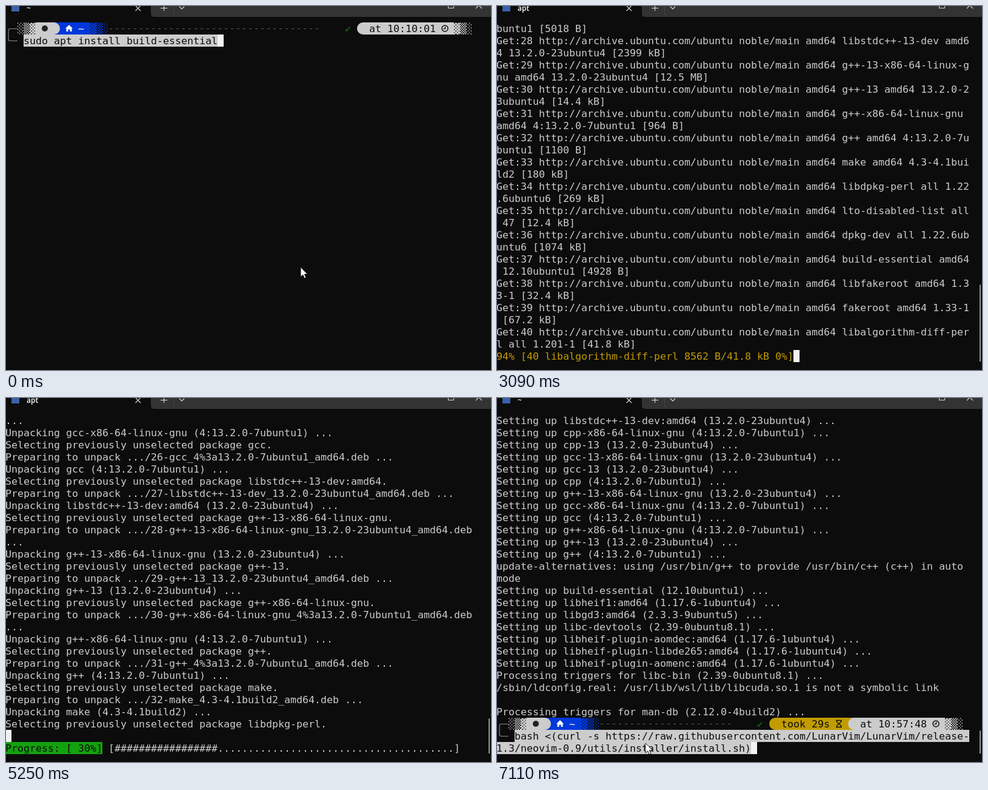
An HTML page with a canvas for the animation above (8000 ms loop, 800 by 600 pixels).

```html
<!DOCTYPE html>
<html lang="en">
<head>
<meta charset="utf-8">
<title>Terminal install</title>
<style>
html, body { margin: 0; width: 100%; height: 100%; overflow: hidden; background: #0c0c0c; }
canvas { display: block; }
</style>
</head>
<body>
<canvas id="c" width="800" height="600"></canvas>
<script>
const g = document.getElementById('c').getContext('2d');
const COLS = 78, ROWS = 28, LOOP = 8000;
const BG = '#0c0c0c', FG = '#cccccc', WHITE = '#f2f2f2', YELLOW = '#c19c00', BLUE = '#0037da';

// ---- package data: name, version, size ----
const VERSIONS = {
  G: '13.2.0-23ubuntu4', P: '4:13.2.0-7ubuntu1', S: '14-20240412-0ubuntu1',
  H: '1.17.6-1ubuntu4', L: '2.39-0ubuntu8.1'
};
const full = s => s.replace(/~/g, '-x86-64-linux-gnu');
const pkgs = full(`libc-dev-bin L 20.4k|linux-libc-dev 6.8.0-31.31 1591k|libcrypt-dev 1:4.4.36-4build1 112k
rpcsvc-proto 1.4.2-0ubuntu7 67.4k|libc6-dev L 2124k|gcc-13-base G 49.0k|libisl23 0.26-3build1 680k
libmpc3 1.3.1-1build1 54.5k|cpp-13~ G 11.2M|cpp-13 G 1032|cpp~ P 5326|cpp P 22.4k|libcc1-0 S 47.7k
libgomp1 S 147k|libitm1 S 28.9k|libatomic1 S 10.4k|libasan8 S 3024k|liblsan0 S 1313k|libtsan2 S 2736k
libubsan1 S 1175k|libhwasan0 S 1632k|libquadmath0 S 153k|libgcc-13-dev G 2688k|gcc-13~ G 21.9M
gcc-13 G 482k|gcc~ P 1212|gcc P 5018|libstdc++-13-dev G 2399k|g++-13~ G 12.5M|g++-13 G 14.4k
g++~ P 964|g++ P 1100|make 4.3-4.1build2 180k|libdpkg-perl 1.22.6ubuntu6 269k
lto-disabled-list 47 12.4k|dpkg-dev 1.22.6ubuntu6 1074k|build-essential 12.10ubuntu1 4928
libfakeroot 1.33-1 32.4k|fakeroot 1.33-1 67.2k|libalgorithm-diff-perl 1.201-1 41.8k
libalgorithm-diff-xs-perl 0.04-8build3 11.2k|libalgorithm-merge-perl 0.08-5 11.4k
libaom3 3.8.2-2build1 1941k|libheif-plugin-aomdec H 10.3k|libde265-0 1.0.15-1build3 166k
libheif-plugin-libde265 H 8158|libheif1 H 276k|libxpm4 1:3.5.17-1build2 36.5k|libgd3 2.3.3-9ubuntu5 128k
libc-devtools L 29.3k|libfile-fcntllock-perl 0.22-4ubuntu5 30.7k|libheif-plugin-aomenc H 14.7k
manpages-dev 6.7-2 2013k`).split(/[|\n]/).map(line => {
  const [name, v, size] = line.split(' ');
  return {
    name, ver: VERSIONS[v] || v,
    size: size.replace(/[kM]?$/, u => ' ' + u + 'B'),
    kb: parseFloat(size) * ({ k: 1, M: 1000 }[size.slice(-1)] || .001),
    arch: /manpages|lto|dpkg|(diff|merge)-perl/.test(name) ? 'all' : 'amd64',
    label: name + (/^(lib(?!.*(perl|dev-bin|devtools))|linux|gcc-13-base)/.test(name) ? ':amd64' : '')
  };
});
const setupOrder = full(`manpages-dev lto-disabled-list libfile-fcntllock-perl libalgorithm-diff-perl
linux-libc-dev libaom3 libgomp1 libfakeroot gcc-13-base fakeroot rpcsvc-proto make libquadmath0 libmpc3
libatomic1 libdpkg-perl libubsan1 libhwasan0 libxpm4 libcrypt-dev libasan8 libtsan2 libisl23 libde265-0
libc-dev-bin libalgorithm-diff-xs-perl libcc1-0 liblsan0 libitm1 libalgorithm-merge-perl dpkg-dev cpp-13~
libgcc-13-dev libc6-dev libstdc++-13-dev cpp~ cpp-13 gcc-13~ gcc-13 cpp g++-13~ gcc~ gcc g++~ g++-13 g++
build-essential libheif1 libgd3 libc-devtools libheif-plugin-aomdec libheif-plugin-libde265
libheif-plugin-aomenc`).split(/\s/);
const suggested = `cpp-doc gcc-13-locales cpp-13-doc debian-keyring g++-multilib g++-13-multilib gcc-13-doc
gcc-multilib autoconf automake libtool flex bison gdb gcc-doc gcc-13-multilib gdb-x86-64-linux-gnu glibc-doc
bzr libgd-tools libheif-plugin-x265 libheif-plugin-ffmpegdec libheif-plugin-jpegdec libheif-plugin-jpegenc
libheif-plugin-j2kdec libheif-plugin-j2kenc libheif-plugin-rav1e libheif-plugin-svtenc libstdc++-13-doc
make-doc`.split(/\s/);

// ---- terminal log, wrapped to the grid ----
const log = [];
let done = 0;   // dpkg steps finished so far
let item = 0;   // current download
function print(...lines) {
  for (const s of lines) {
    for (let i = 0; i === 0 || i < s.length; i += COLS)
      log.push({ s: s.slice(i, i + COLS), last: i + COLS >= s.length, done, item });
  }
  return log.length - 1;
}
function printList(title, names) {
  print(title);
  let row = ' ';
  for (const n of names) {
    if (row.length + 1 + n.length > 76) { print(row); row = ' '; }
    row += ' ' + n;
  }
  print(row);
}

const COMMAND = 'sudo apt install build-essential';
const names = pkgs.map(p => p.name).sort();
print('', '   ' + COMMAND, '[sudo] password for dana:', 'Reading package lists... Done',
  'Building dependency tree... Done', 'Reading state information... Done');
printList('The following additional packages will be installed:', names.slice(1));
printList('Suggested packages:', suggested);
printList('The following NEW packages will be installed:', names);
const ask = print('0 upgraded, 53 newly installed, 0 to remove and 1 not upgraded.',
  'Need to get 72.5 MB of archives.',
  'After this operation, 260 MB of additional disk space will be used.',
  'Do you want to continue? [Y/n] Y');
const got = pkgs.map((p, i) => {
  item = i + 1;
  const suite = p.ver === VERSIONS.L ? 'noble-updates' : 'noble';
  return print(`Get:${item} http://archive.ubuntu.com/ubuntu ${suite}/main amd64 ${p.name} ${p.arch} ${p.ver} [${p.size}]`);
});
const fetched = print('Fetched 72.5 MB in 22s (3297 kB/s)');
print('Extracting templates from packages: 100%');
let reading;
const unpacked = pkgs.map((p, i) => {
  print(`Selecting previously unselected package ${p.label}.`);
  if (!i) reading = print('(Reading database ... 38372 files and directories currently installed.)');
  const n = String(i).padStart(2, '0');
  print(`Preparing to unpack .../${n}-${p.name}_${p.ver.replace(':', '%3a')}_${p.arch}.deb ...`);
  done++;
  return print(`Unpacking ${p.label} (${p.ver}) ...`);
});
for (const n of setupOrder) {
  const p = pkgs.find(q => q.name === n);
  done++;
  print(`Setting up ${p.label} (${p.ver}) ...`);
  if (n === 'g++') print('update-alternatives: using /usr/bin/g++ to provide /usr/bin/c++ (c++) in auto mode');
}
const end = print('Processing triggers for libc-bin (2.39-0ubuntu8.1) ...',
  '/sbin/ldconfig.real: /usr/lib/wsl/lib/libcuda.so.1 is not a symbolic link', '',
  'Processing triggers for man-db (2.12.0-4build2) ...');

// ---- timing ----
// bursts of redraws: start, end, count
const BURSTS = [[500, 1250, 7], [1380, 2180, 11], [2230, 2990, 11], [3090, 3710, 9], [3810, 3830, 2],
  [3930, 4730, 9], [4830, 5550, 9], [5650, 6450, 9], [6550, 7110, 6]];
// time, bottom log row; a fraction over one half means the row is still empty
const KEYS = [[500, 2], [875, 5], [876, ask], [1380, ask], [2180, got[18]], [3710, reading],
  [4630, unpacked[20]], [5950, unpacked[51] + 1.6], [7110, end]];

function snap(t) {
  const b = BURSTS.filter(b => b[0] <= t).pop();
  if (!b) return 0;
  const d = (b[1] - b[0]) / (b[2] - 1);
  return b[0] + Math.min(Math.floor((t - b[0]) / d + 1e-6), b[2] - 1) * d;
}
function rowAt(t) {
  const i = KEYS.findIndex((k, j) => j === KEYS.length - 1 || t < KEYS[j + 1][0]);
  const [a, b] = [KEYS[i], KEYS[i + 1] || KEYS[i]];
  return a === b ? a[1] : a[1] + (b[1] - a[1]) * (t - a[0]) / (b[0] - a[0]);
}

// ---- drawing ----
const X = col => col * 10 - 1, Y = row => 27 + row * 20;
function rect(x, y, w, h, color) { g.fillStyle = color; g.fillRect(x, y, w, h); }
function line(color, width, ...pts) {
  g.strokeStyle = color;
  g.lineWidth = width;
  g.beginPath();
  pts.forEach(([x, y], i) => i ? g.lineTo(x, y) : g.moveTo(x, y));
  g.stroke();
}
function fill(color, path) { g.fillStyle = color; g.fill(new Path2D(path)); }
function put(col, row, text, color = FG, bg) {
  if (bg) rect(X(col), Y(row), text.length * 10, 20, bg);
  g.fillStyle = color;
  g.font = '16.61px "DejaVu Sans Mono", monospace';
  [...text].forEach((ch, i) => ch !== ' ' && g.fillText(ch, X(col + i), Y(row) + 16));
}
const cursor = (col, row, ch = ' ') => put(col, row, ch, BG, WHITE);

function titleBar(title) {
  fill('#333333', 'M239 0H800V18H245Q239 18 239 12Z');
  rect(9, 0, 13, 9, '#3b62ab');
  g.fillStyle = '#fff';
  g.font = '600 12px "Open Sans", sans-serif';
  g.fillText(title, 34, 8);
  line('#ddd', 1.1, [213.5, -.5], [222, 8]);
  line('#ddd', 1.1, [222, -.5], [213.5, 8]);
  line('#ddd', 1.1, [255, 3.5], [266, 3.5]);
  line('#ddd', 1.1, [260.5, 0], [260.5, 8]);
  rect(276, 0, 1, 14, '#444');
  line('#ddd', 1.1, [286, 1], [290, 5], [294, 1]);
  line('#ddd', 1, [729.5, 0], [729.5, 3.5], [738.5, 3.5], [738.5, 0]);
  line('#ddd', 1.1, [775, 4], [780, -1], [785, 4]);
}

function prompt(row, clock, took) {
  const y = Y(row);
  g.save();
  g.translate(0, y);
  g.strokeStyle = '#8a8a8a';
  g.lineWidth = 1.2;
  g.stroke(new Path2D('M19 10.5H7Q4 10.5 4 13.5V27.5Q4 30.5 7 30.5H19'));
  rect(79, 0, 60, 20, BLUE);
  fill(FG, 'M49 0H79A10 10 0 0 1 79 20H49Z');
  g.fillStyle = '#222';
  g.beginPath();
  g.arc(64, 10, 5, 0, 7);
  g.fill();
  fill('#fff', 'M104 4L110 10H108.500V15H105.500V11.500H102.500V15H99.500V10H98Z');
  for (let c = 17; c < (took ? 39 : 52); c++) rect(X(c) + 2, 10, 4, 1, '#5c5c5c');
  if (took) {
    fill(YELLOW, 'M589 0H459A10 10 0 0 0 459 20H589Z');
    line(BG, 1.4, [559, 4.5], [569, 4.5]);
    line(BG, 1.4, [559, 15.5], [569, 15.5]);
    line(BG, 1.3, [560.5, 5], [560.5, 7], [567.5, 13], [567.5, 15]);
    line(BG, 1.3, [567.5, 5], [567.5, 7], [560.5, 13], [560.5, 15]);
  }
  fill(FG, 'M739 0H589A10 10 0 0 0 589 20H739Z');
  g.strokeStyle = BG;
  g.lineWidth = 1.5;
  g.beginPath();
  g.arc(724, 10, 5, 0, 7);
  g.stroke();
  line(BG, 1.3, [724.5, 7], [724.5, 10.5], [721.5, 10.5]);
  g.restore();
  put(2, row, '░▒▓');
  put(12, row, '~', '#fff');
  put(14, row, '▓▒░', BLUE);
  put(took ? 43 : 56, row, '✔', '#115c0e');
  if (took) put(47, row, took, BG);
  put(60, row, 'at ' + clock, BG);
  put(74, row, '▓▒░');
}

function mouse(x, y) {
  const p = new Path2D(`M${x} ${y}v16l3.700-3.500 2.400 5.700 2.600-1.100-2.400-5.600h5z`);
  g.fillStyle = '#fff';
  g.fill(p);
  g.strokeStyle = '#000';
  g.lineWidth = .8;
  g.stroke(p);
}

function scrollBar(total) {
  if (total <= ROWS) return;
  const h = 15800 / total - 4;
  rect(796, 586 - h, 2, h, '#9a9a9a');
}

function showLog(from, to) {
  for (let i = from; i <= to; i++) put(0, i - from, log[i].s);
}

function status(p) {
  const k = log[p].item;
  if (!k) return '0% [Connecting to archive.ubuntu.com]';
  const kb = pkgs.slice(0, k - 1).reduce((sum, q) => sum + q.kb, 0);
  const { name, size } = pkgs[k - 1];
  return `${Math.min(99, Math.floor(kb / 725 + 1))}% [${k} ${name} 8562 B/${size} 0%]`;
}

function progress(p) {
  const part = log[p].done * .0093, bars = Math.floor(part * 56);
  put(0, 27, `Progress: [${String(Math.floor(part * 100)).padStart(3)}%]`, BG, '#13a10e');
  put(17, 27, '[' + '#'.repeat(bars).padEnd(56, '.') + ']');
}

function running(t) {
  const pos = rowAt(t);
  let p = Math.floor(pos);
  while (!log[p].last) p++;
  const extra = t < 1380 ? 1 : 2;
  const top = Math.max(0, p + extra - ROWS), row = p - top;
  const unpacking = p > fetched + 1;
  const blank = p > reading && pos % 1 >= .5;
  showLog(top, p - 1);
  if (!top) prompt(0, '10:10:01');
  let text = blank ? '' : log[p].s;
  if (p === reading) text = '(Reading database ... 55%';
  if (p === ask && t < 1250) text = text.slice(0, -1);
  put(0, row, text);
  if (unpacking) {
    cursor(0, row, text[0]);
    if (p > reading) progress(blank ? p - 1 : p);
  } else if (extra === 2 && p < fetched) {
    const s = status(p);
    put(0, row + 1, s, YELLOW);
    cursor(s.length, row + 1);
  } else {
    cursor(text.length, row);
  }
  scrollBar(p + extra);
}

function draw(t) {
  rect(0, 0, 800, 600, BG);
  titleBar(t >= 500 && t < 7110 ? 'apt' : '~');
  if (t < 500) {
    prompt(0, '10:10:01');
    put(3, 1, COMMAND, BG, FG);
    cursor(35, 1);
    mouse(486, 430.5);
  } else if (t < 7110) {
    running(t);
  } else {
    showLog(end - 24, end);
    prompt(25, '10:57:48', 'took 29s');
    put(3, 26, 'bash <(curl -s https://raw.githubusercontent.com/LunarVim/LunarVim/release-', BG, FG);
    put(0, 27, '1.3/neovim-0.9/utils/installer/install.sh)', BG, FG);
    cursor(42, 27);
    scrollBar(end + 4);
    mouse(245, 569);
  }
}

let shown = -1;
function tick() {
  const t = snap(performance.now() % LOOP);
  if (t !== shown) draw(shown = t);
  requestAnimationFrame(tick);
}
tick();
</script>
</body>
</html>
```
